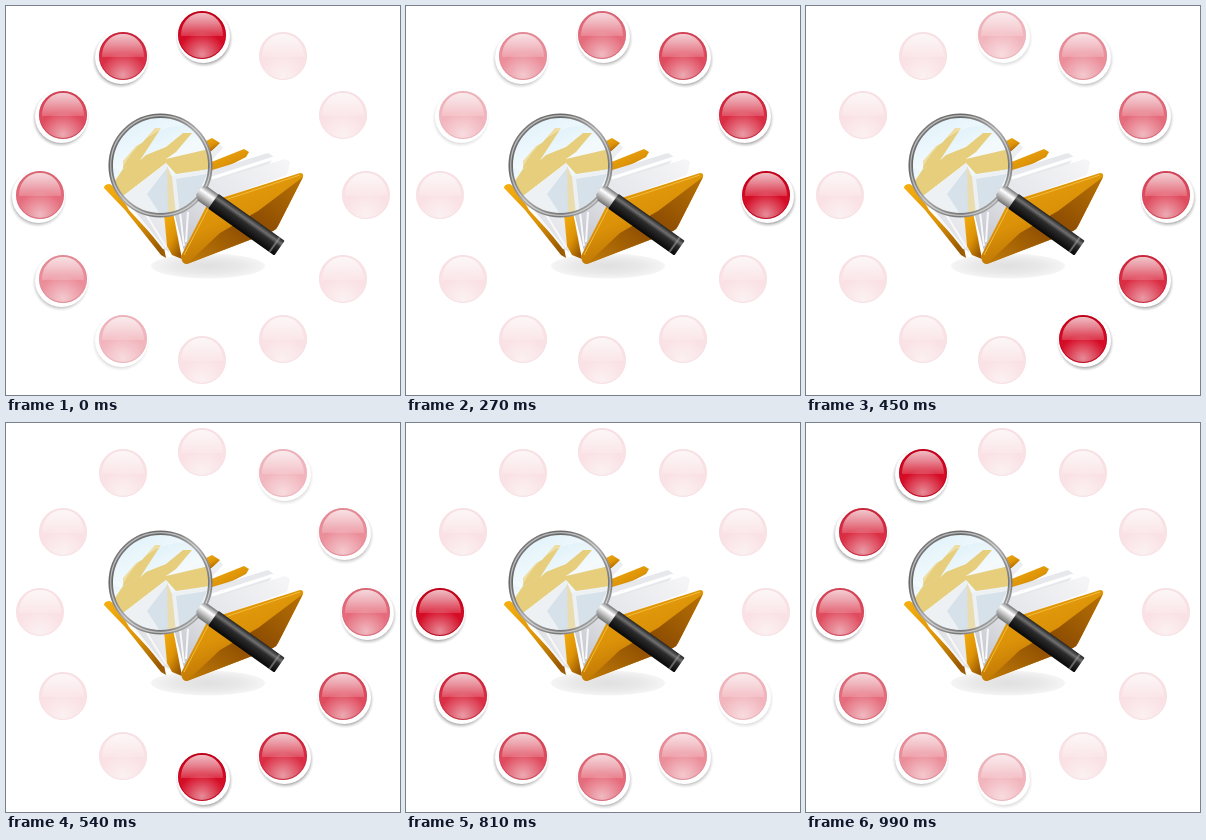
Animation of 394 by 389 pixels, one loop 1080 ms. Source, as an HTML page:

```html
<!DOCTYPE html>
<html lang="en">
<head>
<meta charset="utf-8">
<title>Search loader</title>
<style>
  html, body { margin: 0; width: 100%; height: 100%; overflow: hidden; background: #fff; }
  svg { display: block; width: 394px; height: 389px; }
</style>
</head>
<body>
<svg viewBox="0 0 394 389">
  <defs>
    <linearGradient id="body" x1="0" y1="0" x2="0" y2="1">
      <stop offset="0" stop-color="#c4001a"/>
      <stop offset=".5" stop-color="#d60a24"/>
      <stop offset=".75" stop-color="#d4102a"/>
      <stop offset="1" stop-color="#cc1a30"/>
    </linearGradient>
    <linearGradient id="gloss" x1="0" y1="0" x2="0" y2="1">
      <stop offset="0" stop-color="#fff" stop-opacity=".74"/>
      <stop offset=".45" stop-color="#fff" stop-opacity=".5"/>
      <stop offset="1" stop-color="#fff" stop-opacity=".16"/>
    </linearGradient>
    <radialGradient id="glow" cx=".5" cy=".92" r=".5">
      <stop offset="0" stop-color="#fff" stop-opacity=".5"/>
      <stop offset="1" stop-color="#fff" stop-opacity="0"/>
    </radialGradient>
    <radialGradient id="shade">
      <stop offset=".84" stop-color="#a4a4a4"/>
      <stop offset="1" stop-color="#ddd" stop-opacity="0"/>
    </radialGradient>
    <radialGradient id="floor">
      <stop offset="0" stop-color="#e0e0e0"/>
      <stop offset=".6" stop-color="#e9e9e9"/>
      <stop offset="1" stop-color="#f5f5f5"/>
    </radialGradient>
    <linearGradient id="cover" x1="0" y1="0" x2=".5" y2="1">
      <stop offset="0" stop-color="#eda40e"/>
      <stop offset=".55" stop-color="#dc9208"/>
      <stop offset="1" stop-color="#b06a04"/>
    </linearGradient>
    <linearGradient id="under" x1="1" y1="0" x2="0" y2="1">
      <stop offset="0" stop-color="#b87205"/>
      <stop offset=".5" stop-color="#8a4a02"/>
      <stop offset="1" stop-color="#c27c06"/>
    </linearGradient>
    <linearGradient id="spine" x1="0" y1="0" x2=".7" y2="1">
      <stop offset="0" stop-color="#f6b010"/>
      <stop offset=".6" stop-color="#dc9206"/>
      <stop offset="1" stop-color="#9c5a02"/>
    </linearGradient>
    <linearGradient id="paper" x1="1" y1="0" x2="0" y2="1">
      <stop offset="0" stop-color="#f6f6f8"/>
      <stop offset=".5" stop-color="#e6e7eb"/>
      <stop offset="1" stop-color="#bcbfc6"/>
    </linearGradient>
    <linearGradient id="lens" x1=".2" y1="0" x2=".7" y2="1">
      <stop offset="0" stop-color="#d2ecf8"/>
      <stop offset=".5" stop-color="#f4fafc"/>
      <stop offset="1" stop-color="#e4edf2"/>
    </linearGradient>
    <linearGradient id="ring" x1="0" y1="0" x2="1" y2="1">
      <stop offset="0" stop-color="#8e8e8e"/>
      <stop offset=".25" stop-color="#666"/>
      <stop offset=".5" stop-color="#a9a9a9"/>
      <stop offset=".75" stop-color="#777"/>
      <stop offset="1" stop-color="#ddd"/>
    </linearGradient>
    <linearGradient id="grip" x1="0" y1="0" x2="0" y2="1">
      <stop offset="0" stop-color="#222"/>
      <stop offset=".25" stop-color="#707070"/>
      <stop offset=".45" stop-color="#2c2c2c"/>
      <stop offset="1" stop-color="#080808"/>
    </linearGradient>
    <linearGradient id="steel" x1="0" y1="0" x2="0" y2="1">
      <stop offset="0" stop-color="#777"/>
      <stop offset=".35" stop-color="#fff"/>
      <stop offset="1" stop-color="#707070"/>
    </linearGradient>
    <clipPath id="glass"><circle cx="154.500" cy="159.500" r="49"/></clipPath>
    <g id="halo">
      <circle cx="2.200" cy="3.500" r="29" fill="url(#shade)"/>
      <circle cx="1.500" cy="1.500" r="26.500" fill="#fff"/>
    </g>
    <g id="ball">
      <circle r="24" fill="url(#body)"/>
      <circle r="23" fill="url(#glow)"/>
      <path d="M-21 1C-21-14-11-22 0-22S21-14 21 1Z" fill="url(#gloss)"/>
      <circle r="23.500" fill="none" stroke="#b0001a" stroke-opacity=".5"/>
    </g>
  </defs>

  <g id="dots"></g>

  <ellipse cx="202" cy="260" rx="57" ry="12.500" fill="url(#floor)"/>

  <!-- left folder -->
  <path d="M112 184L130 178 162 160 163 246 158 243Z" fill="url(#paper)"/>
  <path d="M98 182Q98 178 104 178L112 184 123 204 158 242 160 252 155 249 119 204Z" fill="url(#spine)"/>
  <path d="M128 205L158 243M138 205L160 241" fill="none" stroke="#f8f8fa" stroke-width="2"/>

  <!-- middle folder -->
  <path d="M196 137L206 132 214 137 205 146Z" fill="url(#spine)"/>
  <path d="M203 147L214 138 217 142 205 155Z" fill="#eceef1"/>
  <path d="M158 208L167 206 176 253 166 249 161 240Z" fill="url(#spine)"/>

  <!-- right folder -->
  <path d="M203 157L238 143 243 146 240 151 203 170Z" fill="url(#spine)"/>
  <path d="M203 165L262 147 268 151 262 160 203 185Z" fill="#e6e8ec"/>
  <path d="M203 176L279 153 284 156 281 169 206 196 179 249 168 206Z" fill="url(#paper)"/>
  <path d="M206 172L268 152" fill="none" stroke="#fff" stroke-width="3"/>
  <path d="M174 206L178 240M182 206L180 236" fill="none" stroke="#f8f8fa" stroke-width="2"/>
  <path d="M175 250L201 199Q202 196 206 195L294 167Q298 167 297 171L272 220Q271 223 267 225L181 258Q176 259 175 250Z" fill="url(#cover)"/>
  <path d="M297 171L272 220Q271 223 267 225L181 258 214 227 252 205Z" fill="url(#under)"/>
  <path d="M178 249L204 199 294 169" fill="none" stroke="#f3bb3c"/>

  <!-- magnifier -->
  <circle cx="154.500" cy="159.500" r="49" fill="url(#lens)"/>
  <g clip-path="url(#glass)">
    <g fill="#e6ce7c">
      <path d="M117 163L117 155 130 140 136 137 149 122 155 122 133 156Z"/>
      <path d="M128 160L140 149 160 141 177 127 186 127 170 146 160 153Z"/>
      <path d="M104 182L117 163 140 152 160 153 203 143 204 163 170 168 160 157 130 180 117 190Z"/>
    </g>
    <path d="M117 190L131 180 160 157 166 170 204 163 202 185 168 209 133 208Z" fill="#edf1f4"/>
    <path d="M141 188L161 162 166 207 154 208ZM170 173L201 168 183 207 174 208Z" fill="#d6e1ea"/>
    <path d="M161 160L166 171 170 209 162 209Z" fill="#e9dcae"/>
    <path d="M104 160C105 119 145 100 180 119Q137 120 115 165Z" fill="#fff" opacity=".3"/>
  </g>
  <circle cx="154.500" cy="159.500" r="49.800" fill="none" stroke="url(#ring)" stroke-width="4.500"/>
  <circle cx="154.500" cy="159.500" r="49.800" fill="none" stroke="#eee" stroke-opacity=".6" stroke-width="1.200"/>
  <g transform="translate(193 184.500) rotate(35.300)">
    <path d="M0-5L5-8H19V9H5L0 5Z" fill="url(#steel)"/>
    <rect x="18" y="-8.500" width="81" height="18" rx="1" fill="url(#grip)"/>
    <rect x="92" y="-8.500" width="2" height="18" fill="#999" opacity=".6"/>
  </g>
</svg>
<script>
  const STEP = 90;
  const spots = [[196, 29], [277, 50], [337, 109], [360, 189], [337, 273], [277, 333],
                 [196, 354], [117, 333], [57, 273], [34, 189], [57, 109], [117, 50]];
  const count = spots.length;
  // opacity by number of steps since a dot was lit
  const ballFade = [1, .86, .74, .6, .46, .3, .12];
  const haloFade = [1, .97, .92, .82, .68, .4, 0];

  const dots = document.getElementById('dots');

  function add(id, transform) {
    const el = document.createElementNS('http://www.w3.org/2000/svg', 'use');
    el.setAttribute('href', '#' + id);
    el.setAttribute('transform', transform);
    return dots.appendChild(el);
  }

  function cycle(el, fade, index) {
    const frames = Array.from({ length: count + 1 }, (_, s) => {
      const age = (s - index + count) % count;
      return { opacity: fade[Math.min(age, fade.length - 1)], offset: s / count, easing: 'steps(1, end)' };
    });
    const anim = el.animate(frames, { duration: STEP * count, iterations: Infinity });
    anim.startTime = document.timeline.currentTime;
  }

  spots.forEach(([x, y], i) => {
    const side = i > 6 ? -1 : 1;
    cycle(add('halo', `translate(${x} ${y}) scale(${side} 1)`), haloFade, i);
    cycle(add('ball', `translate(${x} ${y})`), ballFade, i);
  });
</script>
</body>
</html>
```
